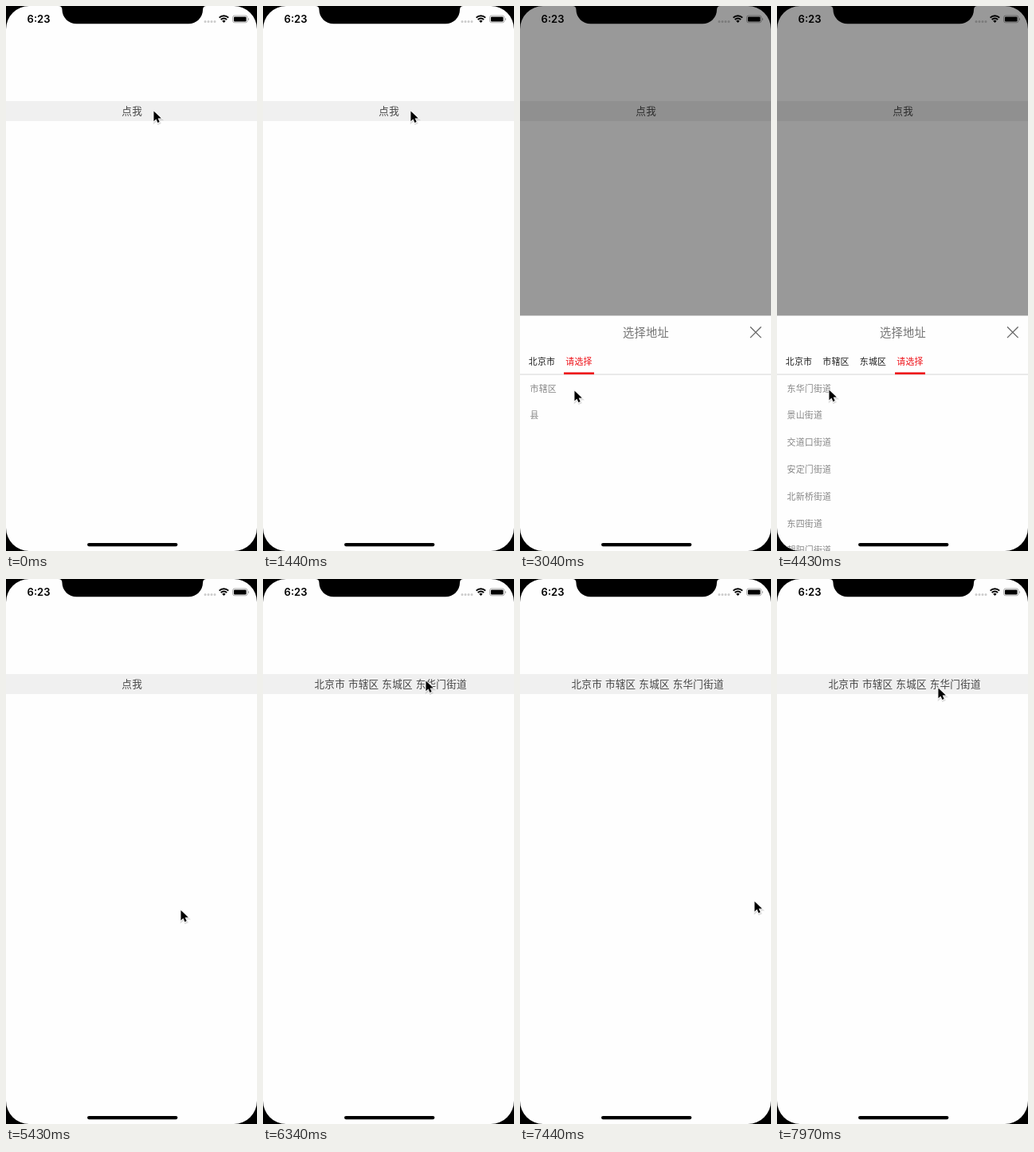
Write an HTML page that moves like this. It is 315 by 682 pixels and loops after 8000 ms.

```html
<!DOCTYPE html>
<html lang="zh-CN">
<head>
<meta charset="utf-8">
<title>选择地址</title>
<style>
html, body { margin: 0; width: 100%; height: 100%; overflow: hidden; background: #fefefe; }
svg { display: block; width: 315px; height: 682px; }
text { font-family: "Noto Sans CJK SC", "Noto Sans CJK", sans-serif; letter-spacing: .018em; white-space: pre; }
.label, .tab { text-anchor: middle; }
.label { font-size: 12.6px; fill: #464646; word-spacing: .9px; }
.title { font-size: 14.28px; fill: #757575; }
.tab { font-size: 10.92px; fill: #1c1c1c; }
.tab.on { fill: #ee1219; }
.row { font-size: 10.92px; fill: #858585; }
.clock { font: 600 13px Inter, "Liberation Sans", sans-serif; letter-spacing: 0; }
</style>
</head>
<body>
<svg viewBox="0 0 315 682">
  <rect width="315" height="682" fill="#fefefe"/>
  <rect y="119" width="315" height="25" fill="#f0f0f0"/>
  <text class="label" id="label" x="158.2" y="136"></text>
  <rect id="shade" width="315" height="682"/>

  <g id="sheet">
    <rect y="387.5" width="315" height="296" fill="#fefefe"/>
    <text class="title" x="129" y="413.8">选择地址</text>
    <path d="M289 401.5l13.6 13.6M302.6 401.5l-13.6 13.6" stroke="#666" stroke-width="1.3"/>
    <path d="M0 461h315" stroke="#d6d6d6"/>
    <g id="tabs"></g>
    <rect id="bar" y="458.4" height="2.6" fill="#ee1219"/>
    <g id="lists"></g>
  </g>

  <text class="clock" x="26.6" y="21">6:23</text>
  <path d="M250 19.5h13" stroke="#000" stroke-opacity=".2" stroke-width="3" stroke-linecap="round" stroke-dasharray="0 4"/>
  <path d="M267.6 14.6a8.2 8.2 0 0 1 11.6 0M269.7 17a5.2 5.2 0 0 1 7.4 0" fill="none" stroke="#000" stroke-width="1.9"/>
  <path d="M273.4 21l-2.2-2.3a3.2 3.2 0 0 1 4.4 0z"/>
  <rect x="284.5" y="12" width="18.4" height="8.8" rx="2.4" fill="none" stroke="#000" stroke-opacity=".35" stroke-width=".9"/>
  <path d="M304 14.8a1.8 1.8 0 0 1 0 3.2z" opacity=".4"/>
  <rect x="285.9" y="13.4" width="15.6" height="6" rx="1.2"/>
  <rect x="102" y="672" width="113.4" height="4.2" rx="2.1"/>

  <path fill-rule="evenodd" d="M0 0H315V682H0ZM29 0A29 29 0 0 0 0 29V653A29 29 0 0 0 29 682H286A29 29 0 0 0 315 653V29A29 29 0 0 0 286 0Z"/>
  <path d="M66 0Q70.5 0 70.5 5A18 17.2 0 0 0 88.5 22.2H229A18 17.2 0 0 0 247 5Q247 0 251.5 0Z"/>

  <g id="cursor">
    <g transform="scale(.87)">
      <path d="M1 2V17l3.5-3 2.5 5 2.6-1.2-2.4-5h4.6z" fill="none" stroke="#000" stroke-opacity=".13" stroke-width="2.6"/>
      <path d="M.5.6V15.2L3.9 12 6.3 17.3 8.8 16.2 6.5 11H11.3Z" stroke="#fff" stroke-width="1.7" paint-order="stroke"/>
    </g>
  </g>
</svg>

<script>
const LOOP = 8000, SHEET_MS = 230, BAR_MS = 110, DROP = 295;
const PLACE = ['北京市', '市辖区', '东城区', '东华门街道'];
const LISTS = [
  '北京市 天津市 河北省 山西省 内蒙古自治区 辽宁省 吉林省',
  '市辖区 县',
  '东城区 西城区 朝阳区 丰台区 石景山区 海淀区 门头沟区',
  '东华门街道 景山街道 交道口街道 安定门街道 北新桥街道 东四街道 朝阳门街道'
];

const PICKS = [2640, 3490, 4320, 5200];    // a row is chosen
const TOGGLES = [1440, 5200, 6340, 7210];  // the sheet opens or closes
const LABEL_AT = 5480;
// cursor stops: arrival time, x, y
const STOPS = [
  [0, 185, 131], [1780, 191, 234], [2240, 7, 494], [2400, 28, 480], [2750, 106, 481],
  [3040, 68, 481], [3220, 50, 481], [4140, 65, 480], [4550, 80, 481], [4970, 59, 487],
  [5430, 219, 414], [6000, 213, 152], [6170, 204, 127], [6750, 278, 419],
  [7090, 294, 403], [7940, 202, 136]
];

const $ = id => document.getElementById(id);
const ease = p => p * p * (3 - 2 * p);
const ramp = (t, from, ms) => ease(Math.max(0, Math.min(1, (t - from) / ms)));
const mix = (a, b, p) => a + (b - a) * p;
const passed = (times, t) => times.filter(s => s <= t).length;

function add(parent, tag, attrs, str = '') {
  const el = document.createElementNS('http://www.w3.org/2000/svg', tag);
  for (const key in attrs) el.setAttribute(key, attrs[key]);
  el.textContent = str;
  return parent.appendChild(el);
}

const groups = LISTS.map(list => {
  const g = add($('lists'), 'g');
  list.split(' ').forEach((name, i) =>
    add(g, 'text', { class: 'row', x: 12.6, y: 482.5 + i * 33.8 }, name));
  return g;
});
const tabs = LISTS.map(() => add($('tabs'), 'text', { y: 449.1 }));

// Longer moves take longer, but the cursor never leaves before a click.
function cursorAt(t) {
  const i = STOPS.findIndex(s => s[0] > t);
  if (i < 0) return STOPS[STOPS.length - 1].slice(1);
  const [left, x0, y0] = STOPS[i - 1], [end, x1, y1] = STOPS[i];
  const clicks = [...PICKS, ...TOGGLES].filter(c => c < end);
  const begin = Math.max(left, ...clicks, end - 80 - 1.5 * Math.hypot(x1 - x0, y1 - y0));
  const p = ramp(t, begin, end - begin);
  return [mix(x0, x1, p), mix(y0, y1, p)];
}

function barFor(chosen) {
  const tab = Math.min(chosen, 3);
  const name = PLACE[tab] && chosen > tab ? PLACE[tab] : '请选择';
  return { tab, name, x: 8.5 + tab * 46.5, width: 0.5 + name.length * 12.5 };
}

function draw(t) {
  const chosen = passed(PICKS, t);
  const now = barFor(chosen), before = barFor(Math.max(0, chosen - 1));

  tabs.forEach((el, i) => {
    const on = i === now.tab;
    el.textContent = on ? now.name : i < chosen ? PLACE[i] : '';
    el.setAttribute('class', on ? 'tab on' : 'tab');
    el.setAttribute('x', on ? now.x + now.width / 2 : 27.5 + i * 46.5);
    groups[i].setAttribute('display', on ? 'inline' : 'none');
  });

  const p = chosen ? ramp(t, PICKS[chosen - 1], BAR_MS) : 1;
  $('bar').setAttribute('x', mix(before.x, now.x, p));
  $('bar').setAttribute('width', mix(before.width, now.width, p));

  $('label').textContent = t < LABEL_AT ? '点我' : PLACE.map(s => ' ' + s).join('');

  const n = passed(TOGGLES, t);
  const slide = n ? ramp(t, TOGGLES[n - 1], SHEET_MS) : 0;
  const up = n % 2 ? slide : n ? 1 - slide : 0;
  $('shade').setAttribute('opacity', 0.4 * up);
  $('sheet').setAttribute('transform', `translate(0 ${DROP * (1 - up)})`);
  $('cursor').setAttribute('transform', `translate(${cursorAt(t).join(' ')})`);
}

const start = performance.now();
function tick() {
  draw((performance.now() - start) % LOOP);
  requestAnimationFrame(tick);
}
tick();
</script>
</body>
</html>
```
